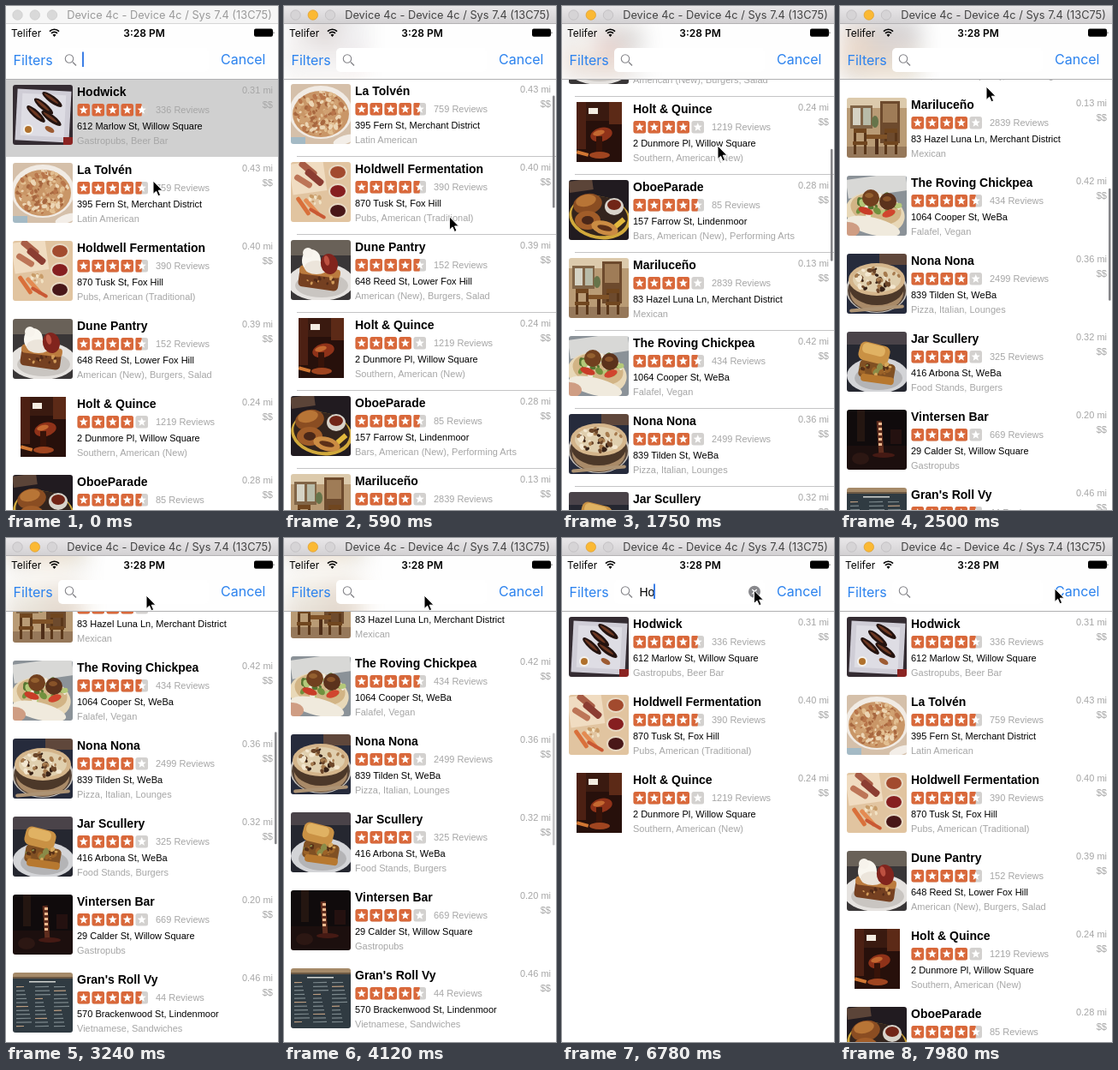
Write an HTML page that moves like this. It is 318 px wide and 588 px high and loops after 8000 ms.

```html
<!DOCTYPE html>
<html lang="en">
<head>
<meta charset="utf-8">
<title>Restaurant search</title>
<style>
  html, body { margin: 0; width: 100%; height: 100%; overflow: hidden; background: #fff; }
  #stage { position: relative; width: 318px; height: 588px; overflow: hidden; background: #fff; }
  #stage > *, #list > svg { position: absolute; left: 0; top: 0; }
  #list { width: 318px; height: 588px; }
  #nav { top: 21px; width: 318px; height: 64px; overflow: hidden; background: #fefefe; border-bottom: 1px solid #b0b0b2; }
  #tint { position: absolute; left: 0; top: -40px; filter: blur(13px) saturate(1.3); opacity: .22; }
  svg { display: block; }
  .row text { font: 11px "Liberation Sans", Arial, sans-serif; }
  .row .name { font-weight: bold; font-size: 14px; }
  .row .dim { fill: #a6a6a6; }
  .photo { filter: blur(.45px); }
  .ui text { font-family: Inter, Roboto, sans-serif; }
  #query { font: 14px "Liberation Sans", Arial, sans-serif; }
</style>
</head>
<body>
<div id="stage">
  <div id="list"></div>
  <div id="nav"><svg id="tint" width="318" height="144"><g id="tintRows"></g></svg></div>
  <svg class="ui" width="318" height="588">
    <defs>
      <linearGradient id="chrome" x2="0" y2="1">
        <stop stop-color="#e9e7e9"/><stop offset="1" stop-color="#d2d0d2"/>
      </linearGradient>
    </defs>
    <rect id="bar" width="318" height="21"/>
    <rect id="edge" y="20" width="318" height="1"/>
    <g id="lights">
      <circle cx="13.5" cy="10.5" r="5.7"/><circle cx="33.8" cy="10.5" r="5.7"/><circle cx="54" cy="10.5" r="5.7"/>
    </g>
    <text id="title" x="191" y="15" font-size="12.8" text-anchor="middle">Device 4c - Device 4c / Sys 7.4 (13C75)</text>

    <text x="6" y="35.5" font-size="12">Telifer</text>
    <g fill="none" stroke="#000" stroke-width="1.7">
      <path d="M51 29.6a7.6 7.6 0 0 1 11 0M53 31.9a4.8 4.8 0 0 1 7 0"/>
      <path d="M56.5 36l-2-2.2a2.9 2.9 0 0 1 4 0z" fill="#000" stroke="none"/>
    </g>
    <text x="161.5" y="35.5" font-size="12" font-weight="600" text-anchor="middle">3:28 PM</text>
    <rect x="290" y="26.6" width="22" height="9.2" rx="2"/>
    <path d="M312.7 29.6q1.6 1.7 0 3.4z"/>

    <rect x="61" y="49" width="176" height="28" rx="5" fill="#fff"/>
    <g fill="#2b82ee" font-size="16">
      <text x="8.5" y="68.5">Filters</text>
      <text x="251" y="68">Cancel</text>
    </g>
    <path d="M78 65.5l4 4" stroke="#85858a" stroke-width="1.4"/>
    <circle cx="74" cy="61.5" r="4.7" fill="none" stroke="#85858a" stroke-width="1.1"/>
    <text id="query" x="90.5" y="67.5"></text>
    <rect id="caret" y="53.5" width="2" height="17.5" fill="#3d7fe6"/>
    <g id="clear">
      <circle cx="225" cy="62.7" r="7" fill="#88888c"/>
      <path d="M222.3 60l5.4 5.4m0-5.4l-5.4 5.4" stroke="#fff" stroke-width="1.2"/>
    </g>
    <rect id="thumb" x="314" width="2.6" height="131" rx="1.3" fill="#86868a"/>
    <path id="cursor" d="M0 0V15.5L3.6 12.2L6 17.7L8.6 16.6L6.2 11.2H11Z" stroke="#fff" stroke-width="1"/>
  </svg>
</div>
<script>
const $ = id => document.getElementById(id);

// Photo helpers on a 70 x 70 field
const oval = (c, x, y, rx, ry = rx, a = 0) =>
  `<ellipse cx="${x}" cy="${y}" rx="${rx}" ry="${ry}" fill="${c}" transform="rotate(${a} ${x} ${y})"/>`;
const box = (c, x, y, w, h, a = 0, r = 0) =>
  `<rect x="${x}" y="${y}" width="${w}" height="${h}" rx="${r}" fill="${c}" transform="rotate(${a} ${x + w / 2} ${y + h / 2})"/>`;
const fill = c => box(c, -2, -2, 74, 74);

function random(seed) {
  return () => (seed = (seed * 16807) % 2147483647) / 2147483647;
}

function scatter(n, seed, colors, cx, cy, rx, ry, size) {
  const rnd = random(seed * 7919);
  let out = '';
  for (let i = 0; i < n; i++) {
    const a = rnd() * 6.283, d = Math.sqrt(rnd()), s = size * (.5 + rnd());
    out += oval(colors[i % colors.length], cx + rx * d * Math.cos(a), cy + ry * d * Math.sin(a), s, s * .7, rnd() * 180);
  }
  return out;
}

const sausage = (x, y, a) => oval('#24130f', x, y, 14, 4.2, a) + oval('#6d3822', x - 1, y - 1, 10, 1.6, a);
const cup = (y, c) => oval('#e8d9c4', 55, y, 11, 9) + oval(c, 55, y, 9, 7);
const chair = x => box('#593619', x, 38, 3, 28) + box('#593619', x + 12, 38, 3, 28) +
  box('#70461f', x, 36, 15, 5) + box('#70461f', x - 1, 51, 17, 4);

const photos = [
  fill('#342c32') + box('#cfcdd6', 4, 6, 63, 60, 3) + box('#dedde4', 10, 11, 51, 49, 3) +
    sausage(46, 17, 36) + sausage(36, 25, 40) + sausage(27, 34, 42) + sausage(45, 39, 36) +
    oval('#f5f2ec', 18, 52, 6) + oval('#b0712c', 18, 52, 4) + box('#8b2422', 59, 61, 11, 9) + oval('#9d5b32', 43, 52, 6, 3, 30),
  fill('#d5c0aa') + oval('#f1ebe4', 35, 33, 37, 31) + oval('#c99667', 35, 35, 33, 27) +
    scatter(150, 3, ['#e2bf92', '#b8754a', '#ecd5b4', '#d0a172', '#a7673f'], 35, 34, 30, 25, 2.7) +
    box('#a4bac5', 0, 62, 17, 8) + oval('#f3eee8', 63, 65, 14, 5, -18),
  fill('#e1c4a0') + box('#f0dcc1', 0, 0, 40, 36, -8) + box('#a85d46', 8, 4, 24, 8, 40, 3) +
    box('#8b3d32', 15, 14, 25, 8, 40, 3) + box('#bd7557', 3, 19, 23, 7, 32, 3) +
    cup(12, '#a24a2e') + cup(34, '#861f20') + cup(57, '#481718') +
    box('#d9703b', 2, 49, 25, 5, 55, 2) + box('#e48b52', 12, 50, 25, 5, 48, 2) + box('#c95834', 20, 58, 22, 4, 30, 2) +
    scatter(12, 9, ['#f2e3c5', '#c89c68'], 30, 44, 9, 5, 2),
  fill('#393637') + box('#696158', 0, 0, 70, 18) + oval('#e5e2df', 35, 49, 39, 22) + oval('#c9c5c1', 36, 53, 31, 14) +
    box('#754021', 9, 37, 47, 20, 8, 5) + box('#bb7b3e', 10, 32, 48, 10, 7, 4) +
    oval('#f9f6ef', 24, 24, 11, 13) + oval('#ece5db', 30, 32, 14, 8) + oval('#f7f3ec', 20, 15, 6) +
    oval('#81241d', 45, 28, 10, 12, -14) + oval('#bd5141', 42, 24, 3, 6, -14) + scatter(12, 5, ['#532b18', '#d19a58'], 34, 47, 18, 5, 2),
  `<svg x="9" width="53" height="70">` + box('#27100b', 0, 0, 53, 70) + box('#4c2013', 0, 0, 11, 55) +
    box('#5c2a17', 38, 0, 15, 26) + box('#3a1a10', 11, 0, 27, 22) + box('#f3ece1', 14, 7, 11, 7) + box('#d17733', 0, 58, 14, 4, 15) +
    oval('#8f3219', 29, 38, 13, 8, -15) + oval('#c46830', 26, 36, 7, 3, -15) + box('#371309', 23, 40, 7, 24) +
    oval('#a04520', 27, 62, 12, 4) + '</svg>',
  fill('#211b20') + box('#5b4438', 0, 0, 28, 13, -8) + oval('#d1a93b', 36, 44, 36, 25, 10) + oval('#33241d', 36, 42, 33, 23, 10) +
    oval('#8a4d22', 22, 28, 17, 12, -12) + oval('#b87536', 20, 24, 12, 7, -12) + oval('#a15d29', 22, 47, 15, 11) + oval('#4a2718', 22, 47, 7, 5) +
    oval('#cb8c43', 42, 56, 16, 8, 15) + oval('#5c3018', 42, 56, 9, 3, 15) +
    oval('#d8d3ca', 53, 31, 11, 10) + oval('#712517', 53, 29, 8, 6) + box('#e3b93d', 53, 47, 13, 6, -40),
  fill('#b99b75') + box('#dccaac', 0, 0, 70, 12) + box('#816547', 4, 9, 26, 27) + box('#d5d3c5', 7, 12, 9, 20) + box('#b8bba8', 19, 12, 9, 20) +
    box('#6d4a2d', 39, 4, 23, 49) + box('#9f7c57', 42, 7, 17, 22) + box('#96785a', 0, 57, 70, 13) + chair(8) + chair(44) +
    box('#7f5227', 23, 43, 24, 5) + box('#4f2e18', 33, 48, 4, 18) + oval('#66744a', 33, 28, 4, 7),
  fill('#8b9298') + box('#d8d8d6', 0, 0, 70, 22, -8) + oval('#e8d8b8', 33, 44, 35, 24, 12) + oval('#d2b485', 34, 39, 30, 18, 12) +
    scatter(34, 11, ['#71913e', '#b4c979', '#f0eadb', '#567631'], 35, 34, 28, 14, 3.4) +
    oval('#71401f', 28, 26, 10) + oval('#5b321c', 48, 30, 10) + oval('#94602f', 26, 23, 5, 3) + oval('#885329', 47, 27, 5, 3) +
    oval('#c93c27', 22, 41, 9, 4, 20) + oval('#d1452e', 49, 44, 8, 4, -20) + oval('#f0eadd', 31, 59, 32, 10, 14) + oval('#cf9d83', 2, 63, 13, 9),
  fill('#262b3c') + box('#5f473b', 38, 0, 32, 13) + oval('#c9c5c0', 35, 42, 36, 27) + oval('#574538', 35, 43, 34, 25) +
    oval('#a98a68', 35, 46, 31, 21) + oval('#4c3829', 35, 39, 32, 21) + oval('#d4b58b', 35, 30, 33, 19) + oval('#e0cfae', 35, 30, 28, 15) +
    scatter(46, 17, ['#382318', '#a67b4e', '#f3e7d0', '#6c4629'], 35, 30, 27, 14, 2.8) + box('#ad9374', 3, 62, 64, 4, -5, 2),
  fill('#252730') + box('#4a4349', 0, 0, 70, 15) + oval('#d3d4d7', 36, 51, 36, 21) + oval('#b4b4b6', 37, 54, 28, 14) +
    box('#805023', 14, 35, 42, 21, 10, 5) + box('#c99144', 14, 14, 36, 22, 14, 7) + box('#e0b263', 18, 15, 27, 12, 14, 5) +
    scatter(25, 23, ['#9c6328', '#573017', '#d7a75b', '#8a8b48'], 35, 44, 20, 7, 3) + box('#b7782f', 16, 51, 39, 9, 8, 4),
  fill('#100b0c') + box('#1c0f0e', 0, 42, 70, 28) + box('#241611', 12, 0, 9, 37) + box('#5f2d1e', 36, 13, 6, 39, -4) +
    [15, 21, 27, 33, 39].map(y => box('#edba8f', 37, y, 4, 3)).join('') + oval('#451a14', 43, 53, 13, 3) +
    box('#241110', 51, 23, 13, 17) + oval('#2c1713', 16, 57, 10, 7),
  fill('#303b42') + box('#a58a69', 0, 0, 70, 5) + box('#6d5944', 0, 5, 70, 2) + box('#d2d5d2', 19, 10, 31, 1.5) +
    Array.from({ length: 33 }, (_, i) => box(i % 5 ? '#7d898d' : '#bb9c80', 4 + (i % 3) * 22, 16 + Math.floor(i / 3) * 4.6,
      9 + (i * 7) % 10, 1.2, -1)).join('')
];

// name | rating | reviews | address | categories | miles
const places = `Hodwick|4.5|336|612 Marlow St, Willow Square|Gastropubs, Beer Bar|0.31
La Tolvén|4.5|759|395 Fern St, Merchant District|Latin American|0.43
Holdwell Fermentation|4.5|390|870 Tusk St, Fox Hill|Pubs, American (Traditional)|0.40
Dune Pantry|4.5|152|648 Reed St, Lower Fox Hill|American (New), Burgers, Salad|0.39
Holt & Quince|4|1219|2 Dunmore Pl, Willow Square|Southern, American (New)|0.24
OboeParade|4.5|85|157 Farrow St, Lindenmoor|Bars, American (New), Performing Arts|0.28
Mariluceño|4|2839|83 Hazel Luna Ln, Merchant District|Mexican|0.13
The Roving Chickpea|4.5|434|1064 Cooper St, WeBa|Falafel, Vegan|0.42
Nona Nona|4|2499|839 Tilden St, WeBa|Pizza, Italian, Lounges|0.36
Jar Scullery|4|325|416 Arbona St, WeBa|Food Stands, Burgers|0.32
Vintersen Bar|4|669|29 Calder St, Willow Square|Gastropubs|0.20
Gran's Roll Vy|4.5|44|570 Brackenwood St, Lindenmoor|Vietnamese, Sandwiches|0.46`
  .split('\n').map(line => line.split('|'));

const starPath = Array.from({ length: 10 }, (_, i) => {
  const r = i % 2 ? 2.3 : 5.4, a = i * Math.PI / 5;
  return `${(7.25 + r * Math.sin(a)).toFixed(2)},${(7.4 - r * Math.cos(a)).toFixed(2)}`;
}).join(' ');

function stars(rating) {
  let out = '';
  for (let i = 0; i < 5; i++) {
    const part = Math.max(0, Math.min(1, rating - i));
    out += `<g transform="translate(${83.5 + 17 * i} 29)"><rect width="14.5" height="14.5" rx="2.5" fill="#d3d1cf"/>` +
      (part ? `<rect width="${14.5 * part}" height="14.5" rx="${part < 1 ? 1 : 2.5}" fill="#d9683a"/>` : '') +
      `<polygon points="${starPath}" fill="#fff"/></g>`;
  }
  return out;
}

const esc = s => s.replace('&', '&amp;');
$('list').innerHTML = places.map(([name, rating, reviews, address, kind, miles], i) => `
  <svg class="row" width="318" height="91">
    <rect class="glow" y="1" width="318" height="90" fill="#d0d0d0" opacity="0"/>
    <rect class="rule" x="15" width="303" height="1" fill="#c4c4c6"/>
    <clipPath id="clip${i}"><rect width="70" height="70" rx="3"/></clipPath>
    <g transform="translate(8 7)" clip-path="url(#clip${i})"><g class="photo">${photos[i]}</g></g>
    <text class="name" x="83" y="20">${esc(name)}</text>${stars(+rating)}
    <text class="dim" x="175" y="40">${reviews} Reviews</text>
    <text x="83" y="59">${address}</text>
    <text class="dim" x="83" y="76">${kind}</text>
    <text class="dim" x="312" y="17" text-anchor="end">${miles} mi</text>
    <text class="dim" x="312" y="34" text-anchor="end">$$</text>
  </svg>`).join('');
const rows = [...document.querySelectorAll('.row')];
const rules = [...document.querySelectorAll('.rule')];
const glow = document.querySelector('.glow');

// Blurred photos that shine through the bar
$('tintRows').innerHTML = photos.map((p, i) =>
  `<g transform="translate(-12 ${111 + 91 * i}) scale(1.5 1)"><svg width="70" height="70">${p}</svg></g>`).join('');

// The screen refreshes only at these moments
const ticks = [0, 140, 290, 430, 580, 730, 880, 1020, 1170, 1320, 1470, 1610, 1750, 1900, 2050, 2200, 2350,
  2500, 2640, 2790, 2940, 3090, 3240, 3390, 3540, 3680, 3830, 3980, 4130, 4270, 4570, 4720, 5020, 5160, 5310,
  5900, 6050, 6190, 6340, 6490, 6640, 6780, 6930, 7080, 7230, 7380, 7530, 7680, 7830, 7980];
const scroll = [[0, 0], [290, 0], [430, 25], [880, 225], [1170, 290], [1470, 325], [1750, 344], [1900, 358],
  [2350, 506], [2500, 531], [2790, 560], [3240, 586], [3680, 589], [4270, 592]];
const pointer = [[0, 172, 204], [290, 188, 285], [880, 199, 205], [1170, 197, 241], [1750, 182, 163],
  [2500, 171, 94], [3240, 164, 67], [5900, 164, 67], [6190, 190, 55], [6490, 224, 61], [7080, 225, 61], [7830, 251, 59]];
const thumbFade = [[290, 0], [430, 1], [3680, 1], [4270, 0]];
const glowFade = [[0, 1], [140, .7], [430, 0]];
const caretOn = [[0, 290], [4130, 4570], [4720, 6190], [6490, 6930], [7080, 7680]];

function at(track, t, k = 1) {
  const i = track.findIndex(p => p[0] > t);
  if (i < 0) return track[track.length - 1][k];
  if (!i) return track[0][k];
  const a = track[i - 1], b = track[i];
  return a[k] + (b[k] - a[k]) * (t - a[0]) / (b[0] - a[0]);
}

const within = (t, from, to) => t >= from && t < to;
const set = (id, attrs) => { for (const k in attrs) $(id).setAttribute(k, attrs[k]); };

function draw(time) {
  const t = ticks.filter(x => x <= time).pop();
  const text = within(t, 5020, 5310) ? 'H' : within(t, 5310, 6930) ? 'Ho' : '';
  const filter = within(t, 5020, 7080) ? text || 'Ho' : '';
  const offset = t < 5020 ? Math.round(at(scroll, t)) : 0;

  let n = 0;
  rows.forEach((row, i) => {
    const show = places[i][0].startsWith(filter);
    row.style.display = show ? '' : 'none';
    if (show) row.style.top = 85 + 91 * n++ - offset + 'px';
    rules[i].setAttribute('opacity', i && within(t, 430, 2400) ? 1 : 0);
  });
  set('tintRows', { transform: `translate(0 ${-offset})`, opacity: Math.min(1, offset / 30) });
  glow.setAttribute('opacity', at(glowFade, t));

  const active = t >= 140;
  set('bar', { fill: active ? 'url(#chrome)' : '#f6f6f6' });
  set('edge', { fill: active ? '#b4b2b4' : '#d6d6d6' });
  set('title', { fill: active ? '#434343' : '#9a9a9a' });
  [...$('lights').children].forEach((c, i) => {
    const lit = active && i === 1;
    c.setAttribute('fill', lit ? '#fbb934' : active ? '#d6d4d6' : '#d9d9d9');
    c.setAttribute('stroke', lit ? '#dfa031' : active ? '#bebcbe' : '#cdcdcd');
    c.setAttribute('stroke-width', .8);
  });

  $('query').textContent = text;
  set('clear', { opacity: text ? 1 : 0 });
  set('caret', {
    x: [89, 100, 107][text.length],
    opacity: caretOn.some(([a, b]) => within(t, a, b)) ? 1 : 0
  });
  set('thumb', { y: 81.8 + .2466 * offset, opacity: t < 5020 ? at(thumbFade, t) : 0 });
  set('cursor', { transform: `translate(${at(pointer, t, 1)} ${at(pointer, t, 2)})` });
}

const start = performance.now();
function loop() {
  draw((performance.now() - start) % 8000);
  requestAnimationFrame(loop);
}
loop();
</script>
</body>
</html>
```
